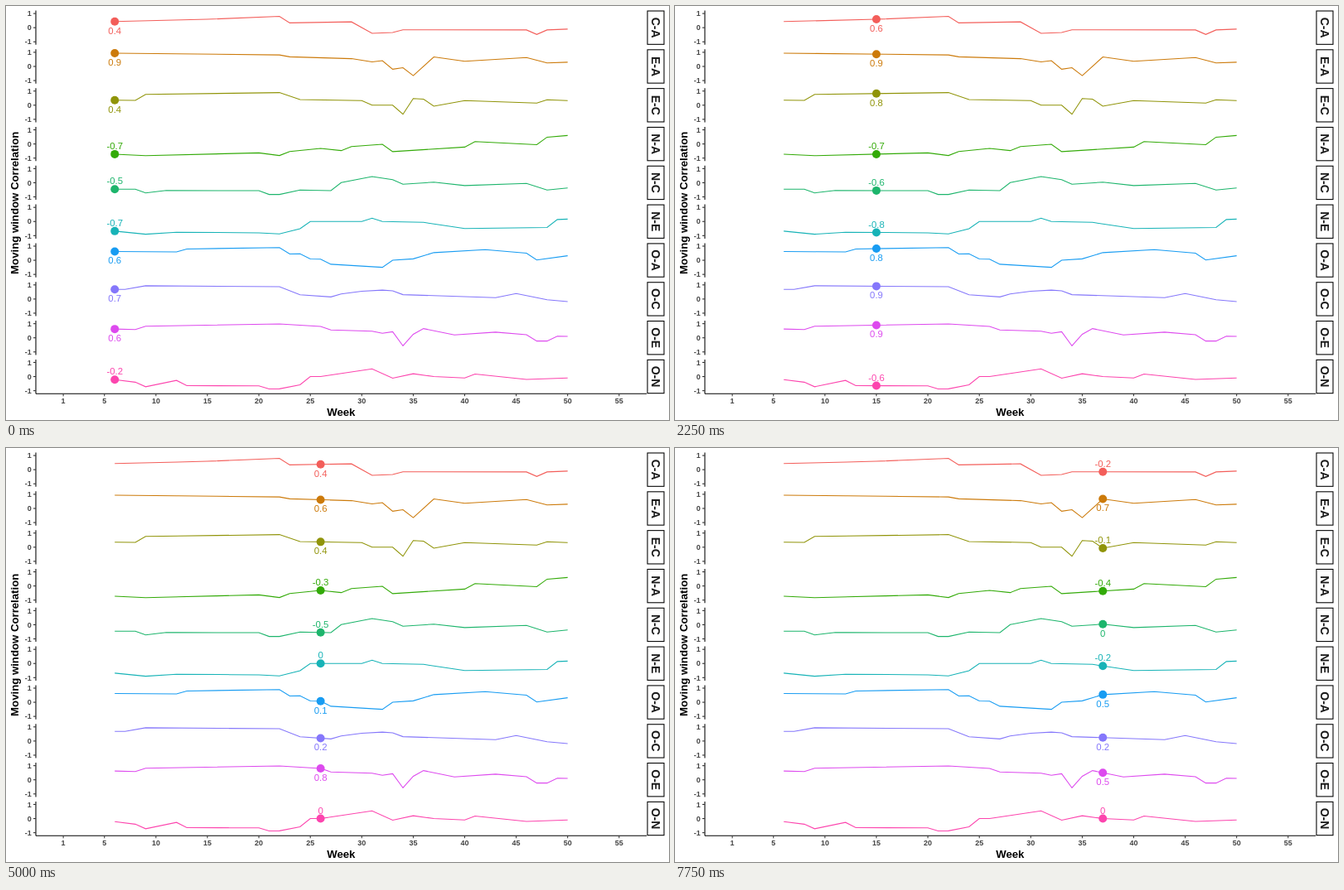
Animation, 800 px wide and 500 px high, one loop 8000 ms. Source, as an HTML page:

```html
<!DOCTYPE html>
<html lang="en">
<head>
<meta charset="utf-8">
<title>Moving window correlation</title>
<style>
html, body { margin: 0; width: 100%; height: 100%; overflow: hidden; background: #fff; }
svg { display: block; width: 800px; height: 500px; font-family: "Liberation Sans", Arial, sans-serif; text-anchor: middle; }
.axis { fill: none; stroke: #000; stroke-width: 1.07; }
.tick { stroke: #333; stroke-width: 1.07; }
.num { font-size: 9px; font-weight: bold; fill: #444; }
.title { font-size: 13.2px; font-weight: bold; }
.strip { font-size: 14px; font-weight: bold; fill: #1a1a1a; }
.curve { fill: none; stroke-width: 1.07; }
.value { font-size: 11.4px; }
</style>
</head>
<body>
<svg id="chart" viewBox="0 0 800 500"></svg>
<script>
const FIRST = 6, STEPS = 32, STEP_MS = 250;
const LEFT = 36, RIGHT = 773, HALF = 20.66, UNIT = 17.07, BASE = 468.2;
const chart = document.getElementById('chart');
const rows = [];

const xAt = week => 56.7 + 12.42 * week;

function add(tag, attrs, text) {
  const el = document.createElementNS('http://www.w3.org/2000/svg', tag);
  for (const k in attrs) el.setAttribute(k, attrs[k]);
  if (text !== undefined) el.textContent = text;
  chart.appendChild(el);
  return el;
}

const line = (cls, x1, y1, x2, y2) => add('line', { class: cls, x1, y1, x2, y2 });

// Straight run between the two turning points around a week.
function valueAt(turns, week) {
  const i = Math.max(1, turns.findIndex(([w]) => w >= week));
  const [w0, v0] = turns[i - 1], [w1, v1] = turns[i];
  return v0 + (v1 - v0) * (week - w0) / (w1 - w0);
}

// One panel; turns are [week, correlation] where the curve bends.
function panel(name, color, ...turns) {
  const zero = 26.16 + 46.82 * rows.length;
  const yAt = v => zero - v * UNIT;
  line('axis', LEFT, zero - HALF, LEFT, zero + HALF);
  for (const v of [1, 0, -1]) {
    line('tick', LEFT - 3, yAt(v), LEFT, yAt(v));
    add('text', { class: 'num', x: 30.8, y: yAt(v) + 3.2, 'text-anchor': 'end' }, v);
  }
  add('rect', { class: 'axis', x: 774, y: zero - HALF + 0.5, width: 20, height: 2 * HALF - 1 });
  add('text', { class: 'strip', transform: `translate(779.2 ${zero}) rotate(90)` }, name);
  const points = turns.map(([w, v]) => xAt(w) + ',' + yAt(v)).join(' ');
  add('polyline', { class: 'curve', stroke: color, points });
  const dot = add('circle', { r: 5, fill: color });
  const label = add('text', { class: 'value', fill: color });
  rows.push({ turns, yAt, dot, label });
}

panel('C-A', '#f35e5a', [6, .43], [15, .59], [22, .8], [23, .34], [29, .41], [31, -.4], [33, -.34],
  [34, -.15], [46, -.16], [47, -.48], [48, -.16], [50, -.1]);
panel('E-A', '#cc7a0a', [6, .94], [22, .81], [23, .68], [29, .55], [31, .32], [32, .41], [33, -.2],
  [34, -.09], [35, -.65], [37, .67], [40, .36], [46, .63], [48, .25], [50, .3]);
panel('E-C', '#909409', [6, .35], [8, .34], [9, .76], [22, .89], [24, .4], [30, .33], [31, 0], [33, 0],
  [34, -.64], [35, .47], [36, .43], [37, -.07], [40, .33], [47, .15], [48, .38], [50, .32]);
panel('N-A', '#33aa08', [6, -.72], [9, -.83], [20, -.63], [22, -.82], [23, -.54], [26, -.32], [28, -.47],
  [29, -.18], [32, -.02], [33, -.54], [40, -.22], [41, .17], [47, -.05], [48, .48], [50, .6]);
panel('N-C', '#1db56c', [6, -.46], [8, -.46], [9, -.72], [11, -.55], [20, -.56], [21, -.83], [22, -.83],
  [24, -.52], [27, -.56], [28, .01], [31, .44], [33, .22], [34, -.11], [37, .04], [40, -.2], [46, -.05], [48, -.52], [50, -.37]);
panel('N-E', '#17b3b7', [6, -.68], [9, -.9], [12, -.76], [20, -.8], [22, -.88], [24, -.51], [25, 0], [30, 0],
  [31, .23], [32, 0], [36, -.06], [40, -.5], [48, -.42], [49, .14], [50, .17]);
panel('O-A', '#189cf2', [6, .62], [12, .59], [13, .8], [22, .9], [23, .44], [24, .46], [25, .09], [26, .08],
  [27, -.28], [32, -.5], [33, 0], [35, .1], [37, .54], [42, .75], [46, .5], [47, .02], [50, .32]);
panel('O-C', '#8577fb', [6, .68], [7, .68], [9, .94], [22, .87], [24, .3], [27, .15], [28, .36], [30, .55],
  [32, .63], [33, .58], [34, .31], [43, .1], [45, .39], [48, -.05], [50, -.18]);
panel('O-E', '#dd4aee', [6, .62], [8, .58], [9, .82], [22, .98], [26, .8], [27, .56], [31, .47], [32, .32], [33, .43],
  [34, -.57], [35, .25], [36, .65], [39, .2], [43, .4], [46, .22], [47, -.23], [48, -.23], [49, .11], [50, .1]);
panel('O-N', '#fc45ae', [6, -.22], [8, -.4], [9, -.72], [12, -.27], [13, -.64], [20, -.66], [21, -.88], [22, -.87],
  [24, -.58], [25, 0], [26, 0], [31, .54], [33, -.11], [35, .2], [37, 0], [40, -.1], [41, .18], [46, -.2], [50, -.1]);

line('axis', LEFT, BASE, RIGHT, BASE);
for (let week = 0; week <= 55; week += 5) {
  const shown = week || 1;
  line('tick', xAt(shown), BASE, xAt(shown), BASE + 3);
  add('text', { class: 'num', x: xAt(shown), y: 480.4 }, shown);
}
add('text', { class: 'title', x: 404.3, y: 495 }, 'Week');
add('text', { class: 'title', transform: 'translate(15 237.8) rotate(-90)' }, 'Moving window Correlation');

function draw(ms) {
  const week = FIRST + Math.floor(ms / STEP_MS) % STEPS;
  const x = xAt(week);
  for (const { turns, yAt, dot, label } of rows) {
    const v = valueAt(turns, week), y = yAt(v);
    dot.setAttribute('cx', x);
    dot.setAttribute('cy', y);
    label.setAttribute('x', x);
    label.setAttribute('y', y + (v > 0 ? 14.8 : -5.8));
    label.textContent = String(Math.round(v * 10) / 10);
  }
}

let start;
function tick(now) {
  if (start === undefined) start = now;
  draw(now - start);
  requestAnimationFrame(tick);
}
draw(0);
requestAnimationFrame(tick);
</script>
</body>
</html>
```
